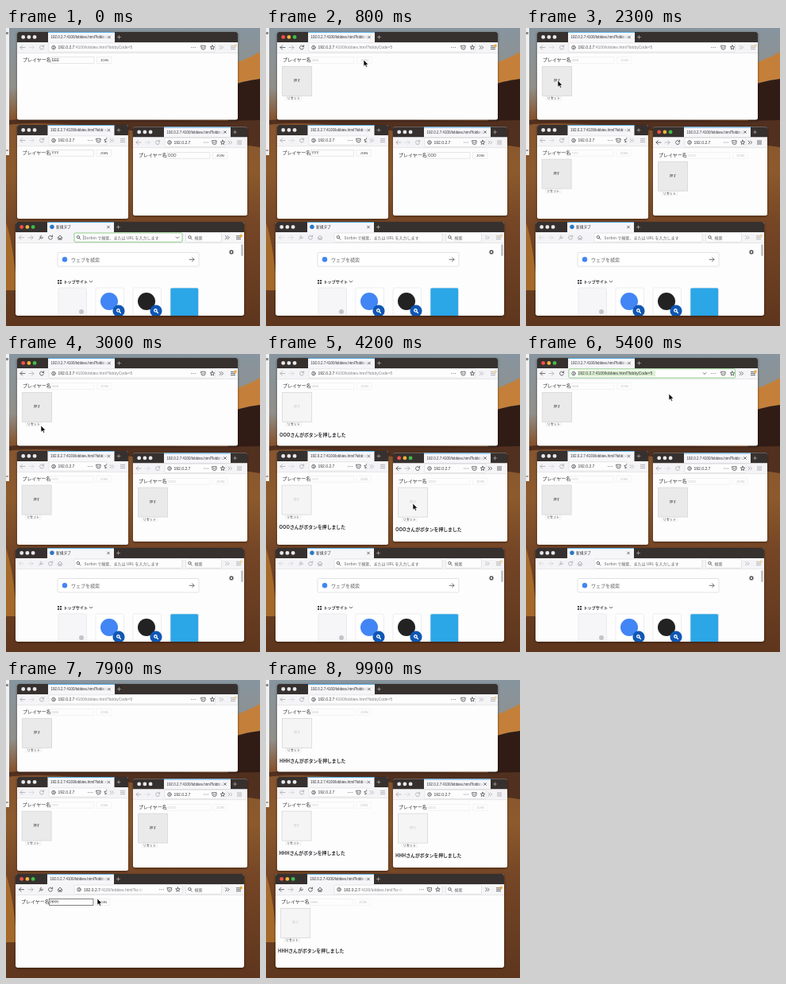
An HTML page that plays this animation: 320 by 375 pixels, repeating every 10000 ms.

```html
<!DOCTYPE html>
<html lang="ja">
<head>
<meta charset="utf-8">
<title>Sessions</title>
<style>
html, body { margin: 0; width: 100%; height: 100%; overflow: hidden; background: #6d4024; }
svg { display: block; width: 100%; height: 100%; }
text { font-family: "Liberation Sans", "Noto Sans CJK JP", "Noto Sans CJK", sans-serif; fill: #333338; }
.jp { font-family: "Noto Sans CJK JP", "Noto Sans CJK", sans-serif; }
.win { filter: drop-shadow(0 1px 1.5px rgba(15, 5, 0, .5)); }
.line { fill: none; stroke: #4c4c52; stroke-width: .8; stroke-linecap: round; stroke-linejoin: round; }
[data-t] { visibility: hidden; }
[data-t].on { visibility: inherit; }
</style>
</head>
<body>
<svg id="stage" viewBox="0 0 320 375" preserveAspectRatio="none"></svg>
<script>
const LOOP = 10000, STEP = 100;
const HOST = '192.0.2.7';
const REST = ':4100/lobbies.html?lobbyCode=5';
const ADDRESS = HOST + REST;
const PAPER = '#fdfdfd', BAR = '#f5f5f7', DARK = '#36312f', EDGE = '#dcdcdf', GREEN = '#6cc063';

// Time spans in ms: "from-to,from-to"
const JOIN = [700, 1300, 1900, 8200];
const FOCUS = ['700-1300,2400-3300,4900-5700', '1300-1900,3300-4100', '1900-2400,4100-4900', '0-700,5700-10000'];
const BLUR = ['0-700,1300-2400,3300-4900,5700-10000', '0-1300,1900-3300,4100-10000', '0-1900,2400-4100,4900-10000', '700-5700'];
const PLAYERS = ['EEE', 'YYY', 'OOO', 'HHH'];
// Press, reset, player
const PRESSES = [[2400, 2900, 0], [3300, 3700, 1], [4100, 4500, 2], [9200, LOOP, 3]];
const NEW_TAB = '0-6600', LOADED = '6600-10000', SUGGEST = '5900-6600', SELECTED = '4900-5700';

const at = (spans, body) => `<g data-t="${spans}">${body}</g>`;
const rect = (x, y, w, h, fill, more = '') => `<rect x="${x}" y="${y}" width="${w}" height="${h}" fill="${fill}" ${more}/>`;
const dot = (x, y, r, fill, more = '') => `<circle cx="${x}" cy="${y}" r="${r}" fill="${fill}" ${more}/>`;
const text = (x, y, size, s, more = '') => `<text x="${x}" y="${y}" font-size="${size}" ${more}>${s}</text>`;
const jp = (x, y, size, s, more = '') => text(x, y, size, s, 'class="jp" ' + more);
const box = (x, y, w, h, stroke = EDGE, fill = PAPER, more = '') =>
  rect(x, y, w, h, fill, `stroke="${stroke}" stroke-width=".7" ${more}`);
const grey = s => `<tspan fill="#85858c">${s}</tspan>`;
const faint = s => `<tspan fill="#c4c4c9">${s}</tspan>`;

const GLYPHS = {
  back: 'M3 0H-3M-.5-2.5L-3 0L-.5 2.5',
  next: 'M-3 0H3M.5-2.5L3 0L.5 2.5',
  reload: 'M2.2-1.3A2.5 2.5 0 1 0 2.5 .6M2.6-2.8V-1H.8',
  home: 'M-3 .2L0-2.7L3 .2M-2-.3V2.6H-.6V.8H.6V2.6H2V-.3',
  wrench: 'M-2.4 2.4L.8-.8M.5-2.4A1.8 1.8 0 1 0 2.5-.4',
  info: 'M2.3 0A2.3 2.3 0 1 1-2.3 0A2.3 2.3 0 1 1 2.3 0M0-.2V1.1M0-1.2V-1.1',
  more: 'M-2.3 0H-2.2M0 0H.1M2.3 0H2.4',
  pocket: 'M-2.6-2.3H2.6V0A2.6 2.6 0 0 1-2.6 0ZM-1.2-.5L0 .7L1.2-.5',
  star: 'M0-2.8L.8-.9L2.8-.8L1.2 .5L1.7 2.5L0 1.4L-1.7 2.5L-1.2 .5L-2.8-.8L-.8-.9Z',
  halfStar: 'M0-2.8L-.8-.9L-2.8-.8L-1.2 .5L-1.7 2.5L0 1.4',
  chevrons: 'M-2-2L0 0L-2 2M.7-2L2.7 0L.7 2',
  menu: 'M-2.6-2H2.6M-2.6 0H2.6M-2.6 2H2.6',
  find: 'M1.1-.6A1.7 1.7 0 1 1-2.3-.6A1.7 1.7 0 1 1 1.1-.6M.6 .7L2.4 2.5',
  down: 'M-1.8-.8L0 1L1.8-.8',
  plus: 'M-2 0H2M0-2V2',
  close: 'M-1.4-1.4L1.4 1.4M1.4-1.4L-1.4 1.4',
  globe: 'M2.4 0A2.4 2.4 0 1 1-2.4 0A2.4 2.4 0 1 1 2.4 0M-2.4 0H2.4M0-2.4C-1.5-1-1.5 1 0 2.4C1.5 1 1.5-1 0-2.4',
  gear: 'M1.7 0A1.7 1.7 0 1 1-1.7 0A1.7 1.7 0 1 1 1.7 0M0-2.6V-1.9M0 2.6V1.9M-2.6 0H-1.9M2.6 0H1.9M-1.8-1.8L-1.4-1.4M1.8 1.8L1.4 1.4M1.8-1.8L1.4-1.4M-1.8 1.8L-1.4 1.4'
};
const icon = (name, x, y, more = '') => `<path class="line" d="${GLYPHS[name]}" transform="translate(${x} ${y})" ${more}/>`;
const icons = (y, list) => Object.entries(list).map(([name, x]) => icon(name, x, y)).join('');

function wallpaper() {
  return `<defs><linearGradient id="desert" x1="0" y1="0" x2="0" y2="1">
    <stop offset="0" stop-color="#87959f"/><stop offset=".2" stop-color="#918f89"/>
    <stop offset=".3" stop-color="#87552f"/><stop offset=".48" stop-color="#8c5a2c"/>
    <stop offset=".66" stop-color="#754626"/><stop offset="1" stop-color="#5e361d"/>
  </linearGradient></defs>
  <rect width="320" height="375" fill="url(#desert)"/>
  <path d="M280 47Q303 40 320 30V64Q300 66 280 74Z" fill="#c4803a"/>
  <path d="M280 74Q300 66 320 64V124H280Z" fill="#301c15"/>
  <path d="M0 116Q80 110 160 114T320 116V150Q250 140 150 128T0 122Z" fill="#52301f"/>
  <path d="M0 245Q9 270 14 330H0Z" fill="#a56a2a"/>
  ${rect(0, 0, 4, 160, '#f0f0f0')}${rect(0, 5, 3, 3, '#8d8d8d')}${rect(0, 153, 3, 2, '#a5a5a5')}`;
}

function frame(i, x, y, w, h, tab) {
  const lights = colors => colors.map((c, k) => dot(x + 7.7 + 7.2 * k, y + 6.4, 2.4, c)).join('');
  return rect(x, y, w, h, PAPER, 'rx="2.5"')
    + `<path d="M${x} ${y + 13}v-10.5q0-2.5 2.5-2.5h${w - 5}q2.5 0 2.5 2.5v10.5z" fill="${DARK}"/>`
    + at(FOCUS[i], lights(['#f4504a', '#f0b33a', '#3fbd4a']))
    + at(BLUR[i], lights(['#e9e9ec', '#e9e9ec', '#e9e9ec']))
    + rect(x, y + 13, w, 13.5, BAR)
    + rect(tab, y, 84, 13, '#f6f6f9') + rect(tab, y, 84, 1, '#58b0e6')
    + icon('close', tab + 77, y + 6.5) + icon('plus', tab + 89.5, y + 6.5, 'style="stroke:#a5a2a0"')
    + rect(x, y + 26, w, .6, EDGE);
}

// Fades the buttons either side of the address field in inactive windows
const veil = (i, x, y, w, start, end) =>
  at(BLUR[i], rect(x, y + 13.5, start - x - .5, 12, BAR, 'opacity=".55"')
    + rect(end + .5, y + 13.5, x + w - end - .5, 12, BAR, 'opacity=".55"'));

const badge = (x, y) => dot(x + 3, y - 2.2, 1.8, '#f0aa35');
const tabTitle = (x, y) => text(x, y, 4.5, ADDRESS.slice(0, 32) + faint('ba'));

// Player form, laid out at the first window's coordinates
function form(i, dx, dy) {
  const mid = 'text-anchor="middle"', bold = 'font-weight="500"';
  const name = PLAYERS[i], inFront = i === 3;
  const joined = `${JOIN[i]}-${LOOP}`, waiting = `${inFront ? 6600 : 0}-${JOIN[i]}`;
  const presses = PRESSES.filter(p => p[0] > JOIN[i]);
  const opens = [JOIN[i], ...presses.map(p => p[1])];
  const ready = presses.map((p, k) => `${opens[k]}-${p[0]}`).join();
  const pressed = presses.map(p => `${p[0]}-${p[1]}`).join();

  const square = (fill, ink) => box(20.7, 48.3, 37, 37, '#d2d2d2', fill)
    + jp(39.2, 68.3, 4.1, '押す', `${mid} ${bold} style="fill:${ink}"`);
  const typed = (t, s) => at(t, text(58, 42, 4.5, s));
  const value = inFront
    ? typed('7300-7400', name[0]) + typed('7400-7600', name.slice(1)) + typed('7600-8200', name)
    : typed(waiting, name);

  return `<g transform="translate(${dx} ${dy})">`
    + jp(21, 42.1, 6, 'プレイヤー名', bold)
    + at(waiting, box(57, 36.6, 54, 7.8, '#dedede') + box(114.5, 36.6, 18.5, 7.8, '#e8e8e8')
      + text(124, 42, 4.3, 'JOIN', mid)) + value
    + at(joined, box(57, 36.6, 54, 7.8, '#efefef') + box(114.5, 36.6, 18.5, 7.8, '#f2f2f2')
      + text(58.5, 42, 4, name, 'opacity=".3"') + text(124, 42, 4.3, 'JOIN', mid + ' opacity=".3"')
      + box(25, 86.2, 19.5, 4.6, '#ececec') + jp(34.8, 89.9, 4.1, 'リセット', `${mid} ${bold}`))
    + at(ready, square('#eaeaea', '#333338'))
    + at(pressed, square('#f5f5f5', '#cacaca'))
    + presses.map(([from, to, who]) => at(`${from}-${to}`,
        jp(17, 103.5, 5.85, PLAYERS[who] + 'さんがボタンを押しました', 'font-weight="600"'))).join('')
    + (inFront ? at('6900-8200', box(56.5, 36.4, 55.5, 8, '#55555a', 'none')) : '')
    + '</g>';
}

function sessionWindow(i, x, y, w, h, tab, urlEnd, tools, dx, dy) {
  const mid = y + 19.5, start = x + 40, wide = i === 0;
  const field = (stroke, fill) => box(start, y + 13.8, urlEnd - start, 11.2, stroke, fill, 'rx="1.2"');
  const address = s => text(x + 51.5, y + 21.3, 5, s);
  const url = wide
    ? address(HOST + grey(REST)) + at(SELECTED, field(GREEN, PAPER)
        + rect(start + 11, y + 16, 98, 7, '#dcefd2') + address(ADDRESS) + icon('down', 225, mid))
    : address(HOST + faint(':'));
  return `<g class="win">` + frame(i, x, y, w, h, tab) + tabTitle(tab + 3.5, y + 8.2)
    + icons(mid, { back: x + 7, reload: x + 31 }) + icon('next', x + 18, mid, 'opacity=".4"')
    + field(EDGE, PAPER) + url + icon('info', x + 46, mid) + icons(mid, tools)
    + (wide ? badge(tools.menu, mid) : '')
    + veil(i, x, y, w, start, urlEnd) + form(i, dx, dy) + `</g>`;
}

function newTab() {
  const tile = (x, fill) => box(x, 327, 35.5, 42, '#e6e6e8', fill, 'rx="2"');
  const search = x => dot(x, 356, 7.6, '#0f57b4') + icon('find', x, 356, 'style="stroke:#fff;stroke-width:1.3"');
  return icon('gear', 284, 282, 'style="stroke-width:1.1"') + rect(296, 272, 3, 15, '#c6c6c9', 'rx="1.5"')
    + box(65, 282.5, 178, 17.5, '#d6d6d9', '#fff', 'rx="1.5"') + dot(74, 291.3, 3.2, '#4285f4')
    + jp(82, 293.5, 6, 'ウェブを検索', 'fill-opacity=".75"') + icon('next', 234, 291.3)
    + [[65, 317], [68, 317], [65, 320], [68, 320]].map(([x, y]) => rect(x, y, 2.1, 2.1, '#4c4c52')).join('')
    + jp(72.5, 321, 5.1, 'トップサイト', 'font-weight="600"') + icon('down', 107, 319)
    + tile(66, '#f6f6f8') + dot(95, 357, 3, '#c4c4c8')
    + tile(113, '#fff') + dot(130, 344, 11, '#4285f4')
    + tile(160, '#fff') + dot(177, 344, 11, '#222')
    + tile(207, '#2ba6e6') + search(142) + search(189);
}

function suggestions() {
  const colors = ['#4285f4', '#d6382f', '#178a7a', '#29231a', '#d6382f', '#dd6b35', '#c94336', '#3caee6', '#85858a', '#c7463d'];
  return rect(12, 271, 288, 59, PAPER) + rect(14, 273, 284, 11, '#43a82c')
    + icon('globe', 92, 278.6, 'style="stroke:#fff"')
    + text(98, 280.5, 5, 'http://' + ADDRESS.slice(0, 22) + '…', 'style="fill:#fff" font-weight="bold"')
    + jp(178, 280.4, 4.7, '— 開く', 'style="fill:#fff"')
    + box(81, 287, 4, 4, '#77777c') + icon('globe', 92, 289)
    + text(98, 290.8, 5, HOST + ':4100') + jp(135, 290.7, 4.7, '— タブを表示', 'style="fill:#3f9a2b"')
    + rect(12, 295.5, 288, 34.5, '#f1f1f2') + rect(12, 295.5, 288, .6, EDGE)
    + jp(15, 302, 3.9, `http://${HOST}:4100/lobbies.html? を検索:`)
    + rect(12, 304.5, 288, .6, EDGE) + rect(12, 317.5, 288, .6, EDGE)
    + colors.map((c, k) => dot(21 + 18.7 * k, 310.8, 2.5, c)
        + rect(30.3 + 18.7 * k, 306, .5, 11, EDGE)).join('')
    + icon('gear', 79, 323.5, 'opacity=".55"') + rect(12, 329.3, 288, .9, '#c4c4c8');
}

function mainWindow() {
  const y = 263.7;
  const url = stroke => box(86, 258, 136, 11.3, stroke, PAPER, 'rx="1.2"');
  const hint = jp(98.5, 265.6, 5.05, 'Sorbin で検索、または URL を入力します', 'fill-opacity=".75"');
  return `<clipPath id="view"><rect x="12" y="244" width="288" height="118" rx="2.5"/></clipPath>
    <g class="win"><g clip-path="url(#view)">` + frame(3, 12, 244, 288, 118, 52)
    + at(NEW_TAB, dot(58, 250.2, 2.7, '#2a78c4') + jp(63, 252.1, 4.7, '新規タブ', 'font-weight="500"')
      + icon('back', 19.5, y, 'opacity=".4"'))
    + at(LOADED, tabTitle(55.5, 252.2) + icon('back', 19.5, y))
    + icons(y, { wrench: 44, reload: 56, home: 68 }) + icon('next', 31, y, 'opacity=".4"')
    + url(EDGE) + at('0-700,5700-6600', url(GREEN))
    + at('0-5900', icon('find', 91.5, y) + hint)
    + at('0-700', rect(97.6, 260.5, .5, 6.3, '#333') + icon('down', 216, y))
    + at(SUGGEST, icon('find', 91.5, y) + text(98, 265.6, 5, 'http://' + ADDRESS) + icon('next', 216, y))
    + at(LOADED, text(98, 265.6, 5, HOST + grey(REST.slice(0, 21)) + faint('ob'))
      + icons(y, { info: 92, more: 196, pocket: 206, star: 216.5 }))
    + box(226.5, 258, 45, 11.3, EDGE, PAPER, 'rx="1.2"') + icon('find', 232, y)
    + jp(237.5, 265.6, 5, '検索', 'fill-opacity=".75"') + icons(y, { chevrons: 278.5, menu: 293 })
    + badge(293, y) + veil(3, 12, 244, 288, 86, 272)
    + at(NEW_TAB, newTab()) + at(SUGGEST, suggestions())
    + at(LOADED, form(3, -2, 239)) + `</g></g>`;
}

const stage = document.getElementById('stage');
stage.innerHTML = wallpaper()
  + sessionWindow(0, 14, 5, 278, 110.5, 53, 263.5, { more: 236, pocket: 248.5, star: 260, chevrons: 271, menu: 286 }, 0, 0)
  + sessionWindow(1, 14, 122, 140, 118, 52.5, 127, { more: 106, pocket: 116.5, halfStar: 126.5, chevrons: 133, menu: 147 }, -.6, 116.8)
  + sessionWindow(2, 160, 124.5, 144, 111.5, 199, 277, { more: 252, pocket: 262.5, star: 273, chevrons: 282, menu: 294 }, 146, 119.8)
  + mainWindow()
  + `<path id="cursor" d="M0 0V8.2L1.9 6.5L3.2 9.3L4.6 8.7L3.4 6H5.9Z" fill="#0b0b0d" stroke="#fff" stroke-width=".6"/>`;

// Pointer stops: time, x, y
const PATH = [
  [200, 100, 90], [600, 123, 40], [800, 123, 40], [1200, 122, 157], [1400, 122, 157],
  [1600, 257, 166], [1800, 267, 159], [2000, 267, 159], [2300, 40, 66], [2500, 40, 66],
  [2800, 40, 88], [3000, 44, 90], [3200, 39, 184], [3400, 39, 184], [3600, 36, 204],
  [3800, 36, 204], [4000, 185, 188], [4200, 185, 188], [4400, 181, 207], [4600, 181, 207],
  [4800, 150, 24], [5000, 150, 24], [5400, 180, 50], [5700, 160, 263],
  [5900, 160, 263], [6300, 144, 269], [6600, 144, 272], [6900, 84, 279], [7500, 84, 279],
  [7900, 115, 275], [8200, 120, 278], [8400, 120, 278], [8900, 40, 304], [9400, 40, 304], [9700, 110, 352]
];
const timed = [...stage.querySelectorAll('[data-t]')].map(el => ({
  el, spans: el.dataset.t.split(',').map(s => s.split('-').map(Number))
}));
const cursor = document.getElementById('cursor');

function pointer(t) {
  const k = PATH.findIndex(p => p[0] > t);
  if (k < 1) return null;
  const [t0, x0, y0] = PATH[k - 1], [t1, x1, y1] = PATH[k];
  const u = (t - t0) / (t1 - t0), e = u * u * (3 - 2 * u);
  return [x0 + (x1 - x0) * e, y0 + (y1 - y0) * e];
}

function draw(now) {
  const t = Math.floor(now % LOOP / STEP) * STEP;
  for (const { el, spans } of timed) el.classList.toggle('on', spans.some(([a, b]) => t >= a && t < b));
  const p = pointer(t);
  cursor.style.visibility = p ? 'visible' : 'hidden';
  if (p) cursor.setAttribute('transform', `translate(${p[0]} ${p[1]})`);
}

const start = performance.now();
function tick() {
  draw(performance.now() - start);
  requestAnimationFrame(tick);
}
tick();
</script>
</body>
</html>
```
